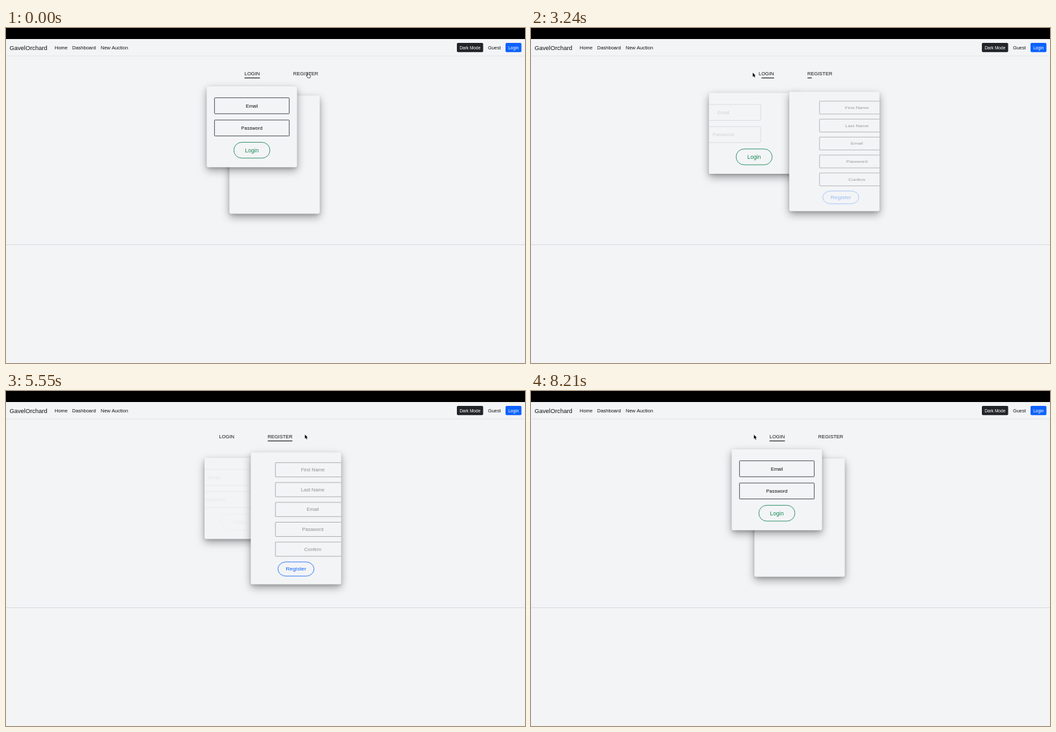
An HTML page with a canvas that plays this animation: 800 px wide and 517 px high, repeating every 8820 ms.

```html
<!DOCTYPE html>
<html lang="en">
<head>
<meta charset="utf-8">
<title>Login and register</title>
<style>
  html, body { margin: 0; width: 100%; height: 100%; overflow: hidden; background: #f3f4f6; }
  canvas { display: block; width: 800px; height: 517px; }
</style>
</head>
<body>
<canvas id="stage"></canvas>
<script>
const W = 800, H = 517, LOOP = 8820;
const PAGE = '#f3f4f6', INK = '#111315', BLUE = '#0d62fd', GREEN = '#198754';
const FONT = '"Liberation Sans", Arial, sans-serif';
const SPEED = 1 / 0.9;                      // page time per clock time
const SWITCHES = [1008, 3127, 5331, 7782];  // alternating: register, login
const CARD_W = 139, FIELD_W = 116, FIELD_H = 24.6, ROW = 34.3, BTN_W = 55.6;

const canvas = document.getElementById('stage');
const ctx = canvas.getContext('2d');
const dpr = window.devicePixelRatio || 1;
canvas.width = W * dpr;
canvas.height = H * dpr;

const clamp = v => Math.max(0, Math.min(1, v));
const lerp = (a, b, p) => a + (b - a) * p;

// CSS cubic-bezier with control points (x1, 0) and (x2, 1)
function bezier(x1, x2) {
  return v => {
    const x = clamp(v);
    if (x === 0 || x === 1) return x;
    let lo = 0, hi = 1, s = 0.5;
    for (let i = 0; i < 24; i++) {
      s = (lo + hi) / 2;
      const r = 1 - s;
      if (3 * r * r * s * x1 + 3 * r * s * s * x2 + s * s * s < x) lo = s; else hi = s;
    }
    return s * s * (3 - 2 * s);
  };
}
const easeIn = bezier(0.42, 1);
const easeOut = bezier(0, 0.58);
const easeInOut = bezier(0.42, 0.58);

const forms = {
  login: {
    label: 'LOGIN', fields: ['Email', 'Password'], button: 'Login', color: GREEN,
    x: 260.85, height: 124.9, dir: 1, squash: 1, tabOn: 379.5, tabOff: 338, tabW: 23.8
  },
  register: {
    label: 'REGISTER', fields: ['First Name', 'Last Name', 'Email', 'Password', 'Confirm'],
    button: 'Register', color: BLUE,
    x: 400.1, height: 227.8, dir: -1, squash: 0.8, tabOn: 420.2, tabOff: 462, tabW: 38
  }
};

function text(str, x, cy, size, color, align = 'left') {
  ctx.font = size + 'px ' + FONT;
  ctx.textAlign = align;
  ctx.fillStyle = color;
  ctx.fillText(str, x, cy + size * 0.358);
}

function box(x, y, w, h, r) {
  ctx.beginPath();
  ctx.roundRect(x, y, w, h, r);
}

function shadow(blur, dy, alpha) {
  ctx.shadowColor = `rgba(0,0,0,${alpha})`;
  ctx.shadowBlur = blur * dpr;
  ctx.shadowOffsetY = dy * dpr;
  ctx.fill();
  ctx.shadowColor = 'transparent';
}

// Slides through the middle position, then on to the resting place
function cardPose(form, on, ms) {
  const q = clamp(ms / 300), first = q < 0.5;
  const p = (on ? easeIn : easeOut)(first ? q * 2 : q * 2 - 1);
  const away = first ? 1 - p : p;
  const front = on !== first;
  return {
    x: form.x + form.dir * CARD_W * (front ? 0.35 : 0.4) * away,
    y: 98.9 + (front ? -9 : 5.35) * away,
    sy: front ? lerp(form.squash, 1, away) : form.squash
  };
}

function drawCard(form, on, ms) {
  const pose = cardPose(form, on, ms);
  const out = easeOut(ms / 300);
  const fade = on ? easeIn(ms / 400) : 1 - out;
  const slide = on ? 1 - easeIn(ms / 350) : out;
  const mid = CARD_W / 2;

  ctx.save();
  ctx.translate(pose.x, pose.y);
  ctx.scale(1, pose.sy);
  box(0, 0, CARD_W, form.height, 2.2);
  ctx.fillStyle = PAGE;
  shadow(13, 5.2, 0.36);
  shadow(4, 2, 0.14);
  ctx.clip();

  ctx.globalAlpha = fade;
  ctx.lineWidth = 0.85;
  ctx.strokeStyle = '#33363a';
  const cx = mid - form.dir * slide * FIELD_W / 2;
  form.fields.forEach((name, i) => {
    const cy = 30.1 + i * ROW;
    box(cx - FIELD_W / 2 + 0.4, cy - FIELD_H / 2, FIELD_W - 0.8, FIELD_H, 0.8);
    ctx.stroke();
    text(name, cx, cy, 7.48, INK, 'center');
  });

  ctx.globalAlpha = on ? 1 : 1 - out;
  const bx = mid - (on ? 0 : form.dir * out * BTN_W * 0.3);
  const by = 30.1 + form.fields.length * ROW;
  box(bx - BTN_W / 2, by - 12.2, BTN_W, 24.4, 12.2);
  ctx.strokeStyle = form.color;
  ctx.stroke();
  text(form.button, bx, by, 8.5, form.color, 'center');
  ctx.restore();
}

function tabCenter(form, on, ms) {
  const p = easeOut(ms / 300);
  return lerp(form.tabOff, form.tabOn, on ? p : 1 - p);
}

function drawTab(form, on, ms) {
  const cx = tabCenter(form, on, ms), left = cx - form.tabW / 2;
  text(form.label, cx, 70.5, 7.5, INK, 'center');
  const p = easeOut(ms / 200);
  const shift = form.dir * 1.01 * form.tabW * (on ? 1 - p : p);
  const a = Math.max(left, left + shift);
  const b = Math.min(left, left + shift) + form.tabW;
  if (b > a) {
    ctx.fillStyle = INK;
    ctx.fillRect(a, 76.5, b - a, 1.1);
  }
}

// start, end, from, to
const MOVES = [
  { a: 1290, b: 1920, from: [465, 69], to: [345, 69.5] },
  { a: 1930, b: 2120, from: [345, 69.5], to: [341.8, 69] },
  { a: 3290, b: 3980, from: [341.8, 69], to: [460, 68] },
  { a: 4810, b: 4880, from: [460, 68], to: [460.7, 67.2] },
  { a: 5590, b: 6185, from: [460.7, 67.2], to: [345.5, 68] },
  { a: 6200, b: 6520, from: [345.5, 68], to: [343.6, 67.6] }
];

function pointerAt(t) {
  let pos = MOVES[0].from;
  for (const m of MOVES) {
    if (t < m.a) break;
    const p = easeInOut((t - m.a) / (m.b - m.a));
    pos = [lerp(m.from[0], m.to[0], p), lerp(m.from[1], m.to[1], p)];
  }
  return pos;
}

const ARROW = new Path2D('M0 0V6.2L1.4 4.9L2.5 7.3L3.6 6.8L2.6 4.5H4.4Z');
const HAND = new Path2D('M-.6 4.5V1.3Q-.6 .4 .1 .4T.8 1.3V3Q1.5 2.5 2 3.1Q2.7 2.7 3.1 3.4' +
  'Q4 3.1 4.1 4V5.6Q4 6.8 3.4 8H.3Q-.3 7-1.8 5.2Q-2 4.2-1.2 4.3Z');

function drawPointer(x, y, hand) {
  ctx.save();
  ctx.translate(x, y);
  ctx.lineJoin = 'round';
  if (hand) {
    ctx.fillStyle = '#fff';
    ctx.strokeStyle = '#111';
    ctx.lineWidth = 0.75;
    ctx.fill(HAND);
    ctx.stroke(HAND);
  } else {
    ctx.fillStyle = '#000';
    ctx.strokeStyle = '#fff';
    ctx.lineWidth = 1;
    ctx.stroke(ARROW);
    ctx.fill(ARROW);
  }
  ctx.restore();
}

function navButton(label, x, w, color) {
  box(x, 23, w, 14.2, 1.8);
  ctx.fillStyle = color;
  ctx.fill();
  text(label, x + w / 2, 30.2, 6.6, '#fff', 'center');
}

function drawPage() {
  ctx.fillStyle = PAGE;
  ctx.fillRect(0, 0, W, H);
  ctx.fillStyle = '#000';
  ctx.fillRect(0, 0, W, 17);
  ctx.fillStyle = '#e1e3e6';
  ctx.fillRect(0, 42.6, W, 1);
  ctx.fillStyle = '#d8dadd';
  ctx.fillRect(0, 334, W, 1);
  text('GavelOrchard', 5.4, 30.2, 9.4, INK);
  text('Home', 75, 30.2, 7.5, INK);
  text('Dashboard', 102, 30.2, 7.5, INK);
  text('New Auction', 146, 30.2, 7.5, INK);
  navButton('Dark Mode', 695, 40.5, '#212529');
  text('Guest', 743, 30.2, 7.4, INK);
  navButton('Login', 770, 24.5, BLUE);
}

function render(t) {
  const count = SWITCHES.filter(s => s <= t).length;
  const ms = count ? (t - SWITCHES[count - 1]) * SPEED : 1e6;
  const loginOn = count % 2 === 0;
  const { login, register } = forms;

  ctx.setTransform(dpr, 0, 0, dpr, 0, 0);
  drawPage();
  drawTab(login, loginOn, ms);
  drawTab(register, !loginOn, ms);

  // The new card comes to the front halfway through
  const loginTop = loginOn === (ms >= 150);
  const cards = [[login, loginOn], [register, !loginOn]];
  if (loginTop) cards.reverse();
  for (const [form, on] of cards) drawCard(form, on, ms);

  const [x, y] = pointerAt(t);
  const over = cards.some(([f, on]) => Math.abs(x - tabCenter(f, on, ms)) < f.tabW / 2);
  drawPointer(x, y, over);
}

function tick() {
  render(performance.now() % LOOP);
  requestAnimationFrame(tick);
}
tick();
</script>
</body>
</html>
```
